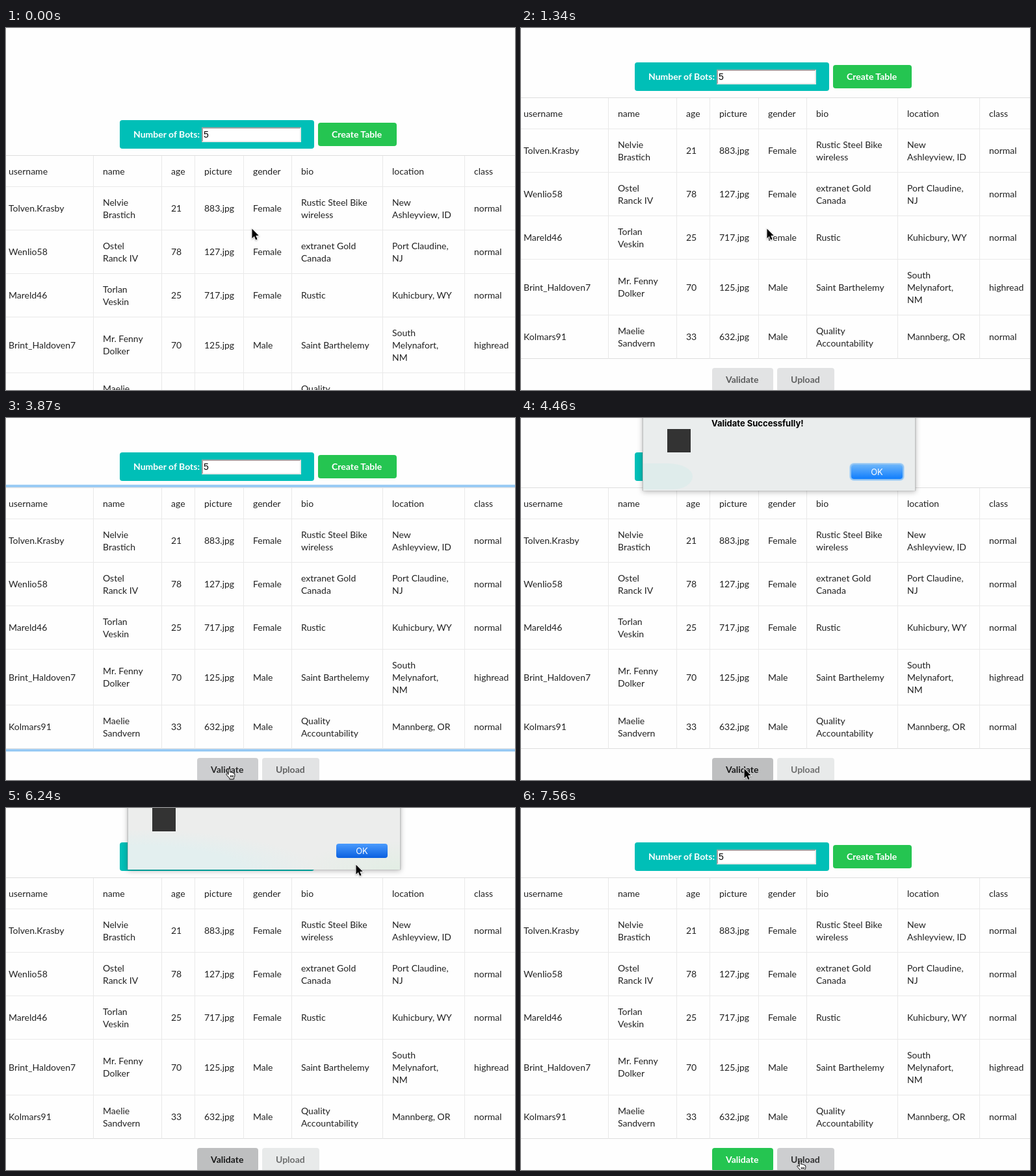
An HTML page for the animation above (8000 ms loop, 783 px wide and 558 px high).

```html
<!DOCTYPE html>
<html lang="en">
<head>
<meta charset="utf-8">
<title>Bot table</title>
<style>
  html, body { margin: 0; width: 100%; height: 100%; overflow: hidden; background: #fefefe; }
  #stage {
    position: relative; width: 783px; height: 558px; overflow: hidden;
    font: 14px/19px Lato, sans-serif; color: rgba(0, 0, 0, .87);
  }
  #stage * { box-sizing: border-box; }
  #page, #page > *, #dialog, #dialog > *, #cursor, #cursor > * { position: absolute; }
  #page, #dialog, #cursor, #arrow, #hand, .anim {
    animation: 8s step-end infinite;
  }
  #page { inset: 0; animation-name: scroll; }

  /* Controls */
  .btn {
    height: 36px; padding-left: 21px; border-radius: 4px;
    font-weight: 700; line-height: 36px; white-space: nowrap;
  }
  #count { left: 175px; top: 53px; width: 299px; height: 44px;
    line-height: 44px; background: #00bfb7; color: #fff; }
  #field { left: 301px; top: 64px; width: 153px; height: 23px; padding-left: 1px;
    border: 2px solid; border-color: #a3a3a3 #e9e9e9 #e9e9e9 #a3a3a3; background: #fff;
    font: 14px/19px "Liberation Sans", Arial, sans-serif; color: #000; }
  #create { left: 480px; top: 57px; width: 121px; background: #25c551; color: #fff; }
  #validate { left: 294px; top: 524px; width: 94px; animation-name: validate; }
  #upload { left: 394px; top: 524px; width: 88px; animation-name: upload; }

  /* Table */
  #table {
    left: -10px; top: 107px; width: 816px; display: grid;
    grid-template-columns: 145px 105px 51px 75px 74px 140px 126px 100px;
    grid-template-rows: 48px 67px 67px 67px 86px 67px;
    border-top: 1px solid #dedede; animation-name: focus;
  }
  #table div {
    display: flex; align-items: center; padding: 0 0 .5px 14px; white-space: pre;
    border: solid #e9e9e9; border-width: 0 1px 1px 0;
  }
  #table div:nth-last-child(-n+8) { border-bottom-color: #dedede; }

  /* Alert sheet */
  #dialog {
    left: 187px; top: -87px; width: 420px; height: 199px;
    background: #eaeded; border: solid #c2c4c4; border-width: 0 1px;
    box-shadow: 0 0 1px rgba(0, 0, 0, .4), 0 2px 8px rgba(0, 0, 0, .27); animation-name: sheet;
    font: 13px/20px Inter, sans-serif; color: #000;
  }
  #tint { left: 0; top: 157px; width: 76px; height: 40px; border-radius: 0 38px 30px 0 / 0 20px 20px 0;
    background: #dfeceb; animation-name: tint; }
  #wash { inset: 0; animation-name: wash;
    background:
      radial-gradient(ellipse 150px 45px at 100% 100%, #e2eee4, transparent),
      radial-gradient(ellipse 290px 62px at 0 100%, #e3efef 60%, transparent), #ecedec; }
  #mark { left: 37px; top: 104px; width: 36px; height: 36px; background: #333; }
  #message { left: 105px; top: 85px; font-weight: 700; white-space: nowrap; }
  #ok { left: 320px; top: 159px; width: 79px; height: 22px; border-radius: 4px;
    line-height: 22px; text-align: center; color: #fff; animation-name: ok; }

  /* Pointer */
  #cursor { left: 0; top: 0; animation-name: move; }
  #cursor svg { overflow: visible; left: 0; top: 0; width: 16px; height: 20px; }
  #arrow { animation-name: arrow; filter: drop-shadow(0 1px 1px rgba(0, 0, 0, .3)); }
  #hand { animation-name: hand; }

  @keyframes scroll {
    0% { transform: translateY(89px); }
    5.625% { transform: translateY(79px); }
    7.5% { transform: translateY(57px); }
    11.25% { transform: translateY(21px); }
    16.75%, 100% { transform: none; }
  }
  @keyframes focus {
    0%, 52%, 100% { box-shadow: none; }
    40.875% { box-shadow: 0 0 0 1px #b9dbf7, 0 0 0 3px #8fc5f3, 0 0 0 4px #a9d3f6, 0 0 0 5px #e2f0fc; }
  }
  @keyframes validate {
    0% { background: #e2e3e4; color: rgba(0, 0, 0, .6); }
    48.375% { background: #cdced0; color: rgba(0, 0, 0, .8); }
    52% { background: #bebfc0; color: rgba(0, 0, 0, .87); }
    81.75%, 100% { background: #25c551; color: #fff; }
  }
  @keyframes upload {
    0%, 81.75% { background: #e2e3e4; color: rgba(0, 0, 0, .57); }
    53.875% { background: #e8eaea; color: rgba(0, 0, 0, .53); }
    94.5%, 100% { background: #cdced0; color: rgba(0, 0, 0, .76); }
  }
  @keyframes sheet {
    0%, 81.75%, 100% { transform: translateY(-140px); }
    53.875% { transform: translateY(-63px); }
    55.75% { transform: none; }
    78% { transform: translateY(-17px); }
    79.875% { transform: translateY(-75px); }
  }
  @keyframes tint { 0%, 78%, 100% { opacity: 0; } 55.75% { opacity: 1; } }
  @keyframes wash { 0%, 100% { opacity: 0; } 78% { opacity: 1; } }
  @keyframes ok {
    0% { background: linear-gradient(#6cb5fa, #0f7dfd); box-shadow: 0 0 0 2px #8fc2f2, 0 0 0 3px #c4dff5; }
    78%, 100% { background: linear-gradient(#4a9bfd, #0a60e0); box-shadow: none; }
  }
  @keyframes arrow { 0%, 53.875% { opacity: 1; } 48.375%, 94.5%, 100% { opacity: 0; } }
  @keyframes hand { 0%, 53.875% { opacity: 0; } 48.375%, 94.5%, 100% { opacity: 1; } }
  @keyframes move {
    0% { transform: translate(378px, 309px); }
    24.25% { transform: translate(372px, 350px); }
    26.08% { transform: translate(360px, 430px); }
    27.92% { transform: translate(348px, 505px); }
    29.75% { transform: translate(341px, 540px); }
    31.58% { transform: translate(346px, 500px); }
    33.42% { transform: translate(360px, 400px); }
    35.25% { transform: translate(376px, 315px); }
    44.625% { transform: translate(430px, 400px); }
    46.5% { transform: translate(479px, 500px); }
    48.375% { transform: translate(343px, 540px); }
    57.625% { transform: translate(362px, 500px); }
    59.5% { transform: translate(415px, 390px); }
    61.25% { transform: translate(470px, 250px); }
    63.125% { transform: translate(510px, 145px); }
    65% { transform: translate(524px, 102px); }
    66.875% { transform: translate(528px, 98px); }
    68.75% { transform: translate(533px, 92px); }
    70.5% { transform: translate(538px, 87px); }
    85.5% { transform: translate(520px, 180px); }
    87.3% { transform: translate(490px, 300px); }
    89.1% { transform: translate(465px, 400px); }
    90.9% { transform: translate(445px, 480px); }
    92.7% { transform: translate(433px, 522px); }
    94.5%, 100% { transform: translate(429px, 543px); }
  }
</style>
</head>
<body>
<div id="stage">
  <div id="page">
    <div id="count" class="btn">Number of Bots:</div>
    <div id="field">5</div>
    <div id="create" class="btn">Create Table</div>
    <div id="table" class="anim"></div>
    <div id="validate" class="btn anim">Validate</div>
    <div id="upload" class="btn anim">Upload</div>
  </div>
  <div id="dialog">
    <div id="tint" class="anim"></div>
    <div id="wash" class="anim"></div>
    <div id="mark"></div>
    <div id="message">Validate Successfully!</div>
    <div id="ok" class="anim">OK</div>
  </div>
  <div id="cursor">
    <svg id="arrow" viewBox="0 0 16 20">
      <path d="M.5.5V15.2L3.9 12L6.2 17.4L8.6 16.4L6.3 11.1H10.8Z" fill="#000" stroke="#fff" stroke-width="1.6" paint-order="stroke"/>
    </svg>
    <svg id="hand" viewBox="0 0 16 20">
      <path transform="translate(-5)" fill="#fff" stroke="#000" stroke-linejoin="round"
        d="M4.2 9.5V2Q4.2.6 5.5.6T6.8 2V6.2Q8.6 5.2 9.2 6.7Q11 5.9 11.5 7.5Q13.8 7 13.8 9.2V11.5Q13.8 13.5 12.6 14.6V16.6H5.8V15.2L1.3 10.3Q.2 8.6 1.7 8.1Q2.8 8 4.2 9.5ZM7.3 10.5V14M9.3 10.5V14M11.2 10.5V14"/>
    </svg>
  </div>
</div>
<script>
  // "/" marks a line break inside a cell
  const rows = [
    'username;name;age;picture;gender;bio;location;class',
    'Tolven.Krasby;Nelvie/Brastich;21;883.jpg;Female;Rustic Steel Bike/wireless;New/Ashleyview, ID;normal',
    'Wenlio58;Ostel/Ranck IV;78;127.jpg;Female;extranet Gold/Canada;Port Claudine,/NJ;normal',
    'Mareld46;Torlan/Veskin;25;717.jpg;Female;Rustic;Kuhicbury, WY;normal',
    'Brint_Haldoven7;Mr. Fenny/Dolker;70;125.jpg;Male;Saint Barthelemy;South/Melynafort,/NM;highread',
    'Kolmars91;Maelie/Sandvern;33;632.jpg;Male;Quality/Accountability;Mannberg, OR;normal'
  ];
  const table = document.getElementById('table');
  for (const text of rows.join(';').split(';')) {
    const cell = document.createElement('div');
    cell.textContent = text.replaceAll('/', '\n');
    table.append(cell);
  }
</script>
</body>
</html>
```
